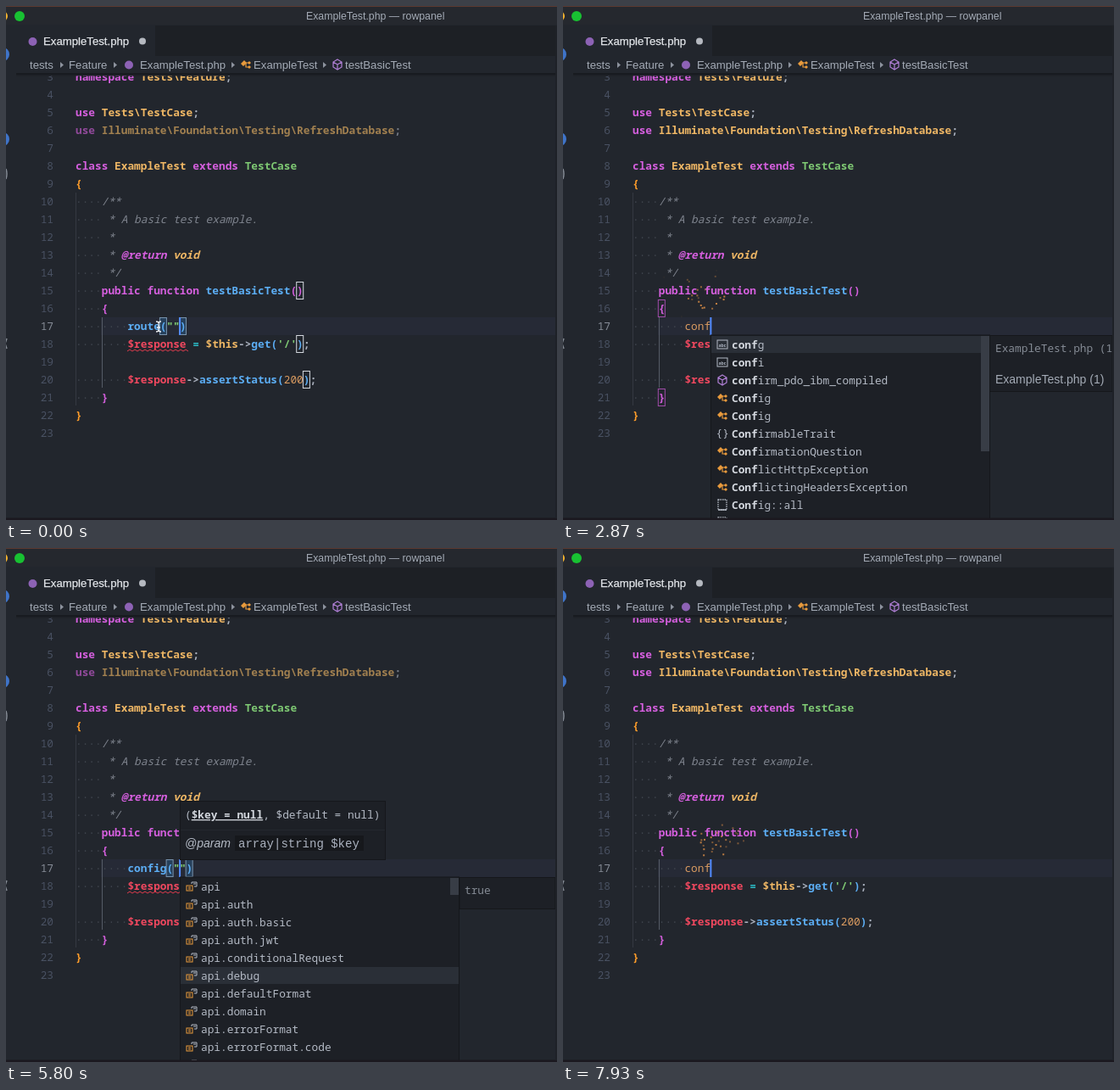
An HTML page that plays this animation: 650x606 px, repeating every 8000 ms.

```html
<!DOCTYPE html>
<html lang="en">
<head>
<meta charset="utf-8">
<title>Editor autocomplete</title>
<style>
html, body { margin: 0; width: 100%; height: 100%; overflow: hidden; background: #22262d; }
svg { display: block; width: 650px; height: 606px; }
text { white-space: pre; font: 12.8px "Noto Sans Mono", "DejaVu Sans Mono", monospace; fill: #abb2bf; }
.k, .t, .v, .f, .g, .m, .b, .o, .p, .i, .j { font-weight: 600; }
.k, .m, .i { fill: #d55fde; }
.t, .j { fill: #efb765; }
.v { fill: #f0485f; }
.f { fill: #5caef5; }
.g { fill: #7ec873; }
.b { fill: #ff9d2a; }
.o { fill: #2bbac5; }
.n { fill: #d89a60; }
.c { fill: #7f848e; }
.c, .i, .j { font-style: italic; }
.num { fill: #495162; text-anchor: end; }
.now { fill: #858b96; }
.dot { fill: #414750; }
.ui { font: 13.2px "Liberation Sans", Arial, sans-serif; fill: #a4abb6; }
.hit { font-weight: 700; fill: #d3d7de; }
.item { fill: #b4bac5; }
.dim { fill: #858b95; }
</style>
</head>
<body>
<svg viewBox="0 0 650 606">
  <rect width="650" height="606" fill="#22262d"/>
  <g id="page"></g>
  <g id="live"></g>
  <g id="head"></g>
</svg>
<script>
const LOOP = 8000, LEFT = 82, CW = 7.68, ROW = 21;
const $ = id => document.getElementById(id);
const colX = col => LEFT + col * CW;
const rowTop = row => 367 + (row - 17) * ROW;
const esc = s => String(s).replace(/&/g, '&amp;').replace(/</g, '&lt;');
const text = (x, y, s, cls = '', extra = '') =>
  `<text x="${x}" y="${y}" class="${cls}" ${extra}>${esc(s)}</text>`;
const rect = (x, y, w, h, fill, stroke = 'none') =>
  `<rect x="${x}" y="${y}" width="${w}" height="${h}" fill="${fill}" stroke="${stroke}"/>`;
const path = (d, stroke, width = 1) =>
  `<path d="${d}" fill="none" stroke="${stroke}" stroke-width="${width}"/>`;
const circle = (x, y, r, fill) => `<circle cx="${x}" cy="${y}" r="${r}" fill="${fill}"/>`;

// Lays out alternating class/text pairs on the character grid.
function code(row, col, ...parts) {
  let out = '';
  for (let i = 0; i < parts.length; i += 2) {
    out += text(colX(col), rowTop(row) + 15, parts[i + 1], parts[i]);
    col += parts[i + 1].length;
  }
  return out;
}
const dots = (row, n) => code(row, 0, 'dot', '·'.repeat(n));
const bracketBox = (row, col, stroke, fill = 'none') =>
  rect(colX(col) - 0.4, rowTop(row) + 0.5, 8, 20, fill, stroke);

const icons = {
  cls: (x, y) => path(`M${x - 2} ${y - 2}H${x + 3}M${x} ${y - 2}V${y + 3}H${x + 3}`, '#e89a3c', 1.2) +
    `<path d="M${x - 6} ${y - 1}l4-4 3 3-4 4zM${x + 2} ${y - 2}l2-2 2 2-2 2zM${x + 2} ${y + 3}l2-2 2 2-2 2z" fill="#e89a3c"/>`,
  cube: (x, y) => path(`M${x} ${y - 6}l5 3v6l-5 3l-5-3v-6zM${x - 5} ${y - 3}l5 3l5-3M${x} ${y}v6`, '#b180d7', 1.2),
  abc: (x, y) => rect(x - 6, y - 5, 12, 10, 'none', '#b4bac5') +
    text(x - 4.6, y + 2.5, 'abc', '', 'style="font-size:5.2px;font-weight:700"'),
  brace: (x, y) => text(x - 7.5, y + 4, '{}', 'item'),
  snip: (x, y) => `<rect x="${x - 5}" y="${y - 6}" width="10" height="12" fill="none" stroke="#b4bac5" stroke-width="1.3" stroke-dasharray="1.5 1"/>` +
    path(`M${x - 5} ${y + 6}h10`, '#b4bac5', 1.5),
  conf: (x, y) => rect(x - 6, y - 1, 7, 6, 'none', '#e89a3c') +
    path(`M${x - 4} ${y + 1}h3M${x - 4} ${y + 3}h3`, '#e89a3c') +
    path(`M${x} ${y - 3}v-2h6v5h-3M${x + 2} ${y - 3}h3`, '#b4bac5')
};

const words = [['abc', 'confg'], ['abc', 'confi'], ['cube', 'confirm_pdo_ibm_compiled'],
  ['cls', 'Config'], ['cls', 'Config'], ['brace', 'ConfirmableTrait'], ['cls', 'ConfirmationQuestion'],
  ['cls', 'ConflictHttpException'], ['cls', 'ConflictingHeadersException'],
  ['snip', 'Config::all'], ['snip', 'Config::get']];
const keys = ['', '.auth', '.auth.basic', '.auth.jwt', '.conditionalRequest', '.debug', '.defaultFormat',
  '.domain', '.errorFormat', '.errorFormat.code', '.errorFormat.debug'].map(s => ['conf', 'api' + s]);

// [time, text on the edited line, caret column]
const edits = [[0, 'route("")', 8], [130, 'route(")', 7], [270, 'route()', 6], [400, 'route', 5],
  [530, 'rout', 4], [670, 'rou', 3], [870, 'ro', 2], [1030, 'r', 1], [1230, '', 0],
  [2470, 'c', 1], [2600, 'co', 2], [2730, 'con', 3], [2820, 'conf', 4], [2970, 'confi', 5],
  [3100, 'config', 6], [3330, 'config()', 7], [3530, 'config("")', 8],
  [7670, 'config()', 7], [7730, 'config', 6], [7800, 'confi', 5], [7870, 'conf', 4]];

const within = (t, a, b) => t >= a && t < b;

function drawPage() {
  let s = rect(112, 367, 538, 21, '#262a36') + path('M82.5 220V471', '#343942') + path('M113.5 367V450', '#555b66');
  for (let n = 3; n <= 23; n++) s += text(56, rowTop(n) + 15, n, n === 17 ? 'num now' : 'num');
  for (const n of [10, 11, 12, 13, 14, 15, 16, 21]) s += dots(n, 4);
  for (const n of [17, 18, 20]) s += dots(n, 8);
  s += code(3, 0, 'k', 'namespace ', 't', 'Tests\\Feature', 'p', ';') +
    code(5, 0, 'k', 'use ', 't', 'Tests\\TestCase', 'p', ';') +
    '<g id="unused">' + code(6, 0, 'k', 'use ', 't', 'Illuminate\\Foundation\\Testing\\RefreshDatabase', 'p', ';') + '</g>' +
    code(8, 0, 'k', 'class ', 't', 'ExampleTest ', 'k', 'extends ', 'g', 'TestCase') +
    code(9, 0, 'b', '{') + code(10, 4, 'c', '/**') +
    code(11, 5, 'c', '* A basic test example.') + code(12, 5, 'c', '*') +
    code(13, 5, 'c', '* ', 'i', '@return ', 'j', 'void') + code(14, 5, 'c', '*/') +
    code(15, 4, 'k', 'public ', 'k', 'function ', 'f', 'testBasicTest', 'm', '()') +
    code(16, 4, 'm', '{') +
    code(18, 8, 'v', '$response ', 'o', '= ', 't', '$this', 'p', '->', 'f', 'get(', 'g', "'/'", 'f', ')', 'p', ';') +
    code(20, 8, 'v', '$response', 'p', '->', 'f', 'assertStatus(', 'n', '200', 'f', ')', 'p', ';') +
    code(21, 4, 'm', '}') + code(22, 0, 'b', '}');
  $('page').innerHTML = s;
}

function drawHead() {
  const arrow = x => `<path d="M${x} 66l4 3.5l-4 3.5z" fill="#8d939e"/>`;
  $('head').innerHTML =
    rect(0, 0, 650, 80, '#22262d') + rect(0, 0, 650, 1, '#5c3a30') + rect(0, 1, 650, 21, '#25282e') +
    rect(176, 23, 474, 36, '#1d2025') + rect(12, 79, 638, 2, '#181b20') + rect(12, 81, 638, 1.5, '#1e2127') +
    rect(0, 603.5, 650, 2.5, '#1b181f') + rect(648, 23, 2, 581, '#1e2127') +
    circle(-4, 12, 6, '#f5b32e') + circle(16, 12, 6, '#18c132') +
    circle(-4, 57, 8, '#3f74c9') + circle(-4, 157, 8, '#3f74c9') +
    path('M0 192q2 6 0 12M1 392l-2 6l2 6', '#858b95', 1.5) +
    text(354, 16, 'ExampleTest.php — rowpanel', 'ui', 'style="font-size:12.3px"') +
    circle(31.5, 42, 5, '#8d62b5') + circle(145, 69.5, 5, '#8d62b5') + circle(161, 41.5, 4, '#b5b9c0') +
    text(44, 46, 'ExampleTest.php', 'ui', 'style="fill:#e3e6ea" stroke="#e3e6ea" stroke-width=".25"') +
    text(28, 74, 'tests', 'ui') + arrow(64) + text(74, 74, 'Feature', 'ui') + arrow(127) +
    text(158, 74, 'ExampleTest.php', 'ui') + arrow(266) + icons.cls(283, 69) +
    text(292, 74, 'ExampleTest', 'ui') + arrow(374) + icons.cube(391, 69) + text(400, 74, 'testBasicTest', 'ui');
}

function list(x, width, rows, pick, match, thumb, textX) {
  const h = rows.length * ROW + 1;
  return rect(x + 0.5, 388, width, h, '#1d2026', '#15171b') +
    rect(x + 1, 389 + pick * ROW, width - 1, 20, '#2a2f37') +
    rect(x + width - 10, 389, 10, thumb, '#383d46') +
    rows.map(([kind, label], i) => {
      const y = 404 + i * ROW;
      return icons[kind](x + 14, y - 5) + text(x + textX, y, label.slice(0, match), 'hit') +
        text(x + textX + match * CW, y, label.slice(match), 'item');
    }).join('');
}

const side = (x, h) => rect(x, 388.5, 648 - x, h, '#1d2026', '#15171b');

function wordPopup(typed, x) {
  const rows = words.filter(w => w[1].toLowerCase().startsWith(typed));
  return list(x, 329, rows, 0, typed.length, Math.min(136, rows.length * ROW), 25) + side(x + 329.5, 66) +
    text(x + 336, 408, 'ExampleTest.php (1)', 'dim') +
    text(x + 336, 445, 'ExampleTest.php (1)', 'ui', 'style="font-size:14px"');
}

// The selection walks down five rows, then back up.
function keyPopup(t) {
  const steps = (start, every) => Math.min(5, Math.max(0, Math.floor((t - start) / every) + 1));
  const pick = steps(5070, 150) - steps(5930, 133);
  return list(205, 329, keys, pick, 0, 20, 25) + side(535, 37) +
    text(541, 408, pick < 4 ? 'array(...)' : 'true', 'dim');
}

function hint() {
  return rect(205.5, 298.5, 242, 69, '#1d2026', '#15171b') + text(211, 319, '(', 'item') +
    text(211 + CW, 319, '$key = null', 'hit', 'text-decoration="underline"') +
    text(211 + 12 * CW, 319, ', $default = null)', 'item') +
    path('M206 332.5H447', '#24282f') + rect(270, 339, 152, 18, '#16181c') +
    text(211, 353, '@param', 'ui', 'style="font-size:14px;font-style:italic;fill:#b4bac5"') +
    text(274, 353, 'array|string $key', '', 'style="font:14px \'Liberation Mono\',monospace"');
}

// Each keystroke throws a burst of sparks up from the caret.
function sparks(t) {
  const rand = n => { const v = Math.sin(n * 127.1) * 43758.545; return v - Math.floor(v); };
  let s = '';
  edits.forEach(([start, , caret], k) => {
    const age = (t - start) / 1000;
    if (!k || age < 0 || age > 0.42) return;
    for (let i = 0; i < 7; i++) {
      const n = k * 31 + i * 3;
      const x = colX(8 + caret) + (rand(n) - 0.5) * (24 + 130 * age);
      const y = 366 - (90 + 170 * rand(n + 1)) * age + 330 * age * age - 14 * rand(n + 2);
      s += `<rect x="${x}" y="${y}" width="2" height="2" fill="#d58a45" opacity="${1 - age / 0.42}"/>`;
    }
  });
  return s;
}

function editedLine(line) {
  const at = line.indexOf('(');
  if (at < 0) return code(17, 8, 'n', line);
  const close = line.indexOf(')');
  return bracketBox(17, 8 + at, '#7893ad', '#27415c') + bracketBox(17, 8 + close, '#7893ad', '#27415c') +
    code(17, 8, 'f', line.slice(0, at + 1), 'g', line.slice(at + 1, close), 'f', ')');
}

function render(t) {
  const [since, line, caret] = edits.filter(e => e[0] <= t).pop();
  const x = colX(8 + caret);
  const stale = within(t, 0, 130) || within(t, 4400, 7670);
  $('unused').setAttribute('opacity', stale || within(t, 1600, 2470) ? 0.62 : 1);

  let s = editedLine(line);
  if (t < 400) s += bracketBox(15, 34, '#d5d9df') + bracketBox(18, 34, '#d5d9df') + bracketBox(20, 35, '#d5d9df');
  if (within(t, 1230, 3330)) s += bracketBox(16, 4, '#a34cab') + bracketBox(21, 4, '#a34cab');
  if (stale) s += path('M143 407' + 'l3 -2l3 2'.repeat(12), '#e23c4e');
  if ((t - since) % 1000 < 500) s += rect(x - 0.8, 367, 2, 21, '#528bff');
  if (t < 130) s += path('M177 372q3 0 3 2v8q0 2-3 2M183 372q-3 0-3 2v8q0 2 3 2M178 379h4', '#eef0f2', 1.3);
  s += sparks(t);
  if (within(t, 2730, 3330)) s += wordPopup(line, Math.round(x));
  if (within(t, 3430, 7000)) s += hint();
  if (within(t, 3600, 6800)) s += keyPopup(t);
  $('live').innerHTML = s;
}

drawPage();
drawHead();
const began = performance.now();
function frame() {
  render((performance.now() - began) % LOOP);
  requestAnimationFrame(frame);
}
frame();
</script>
</body>
</html>
```
